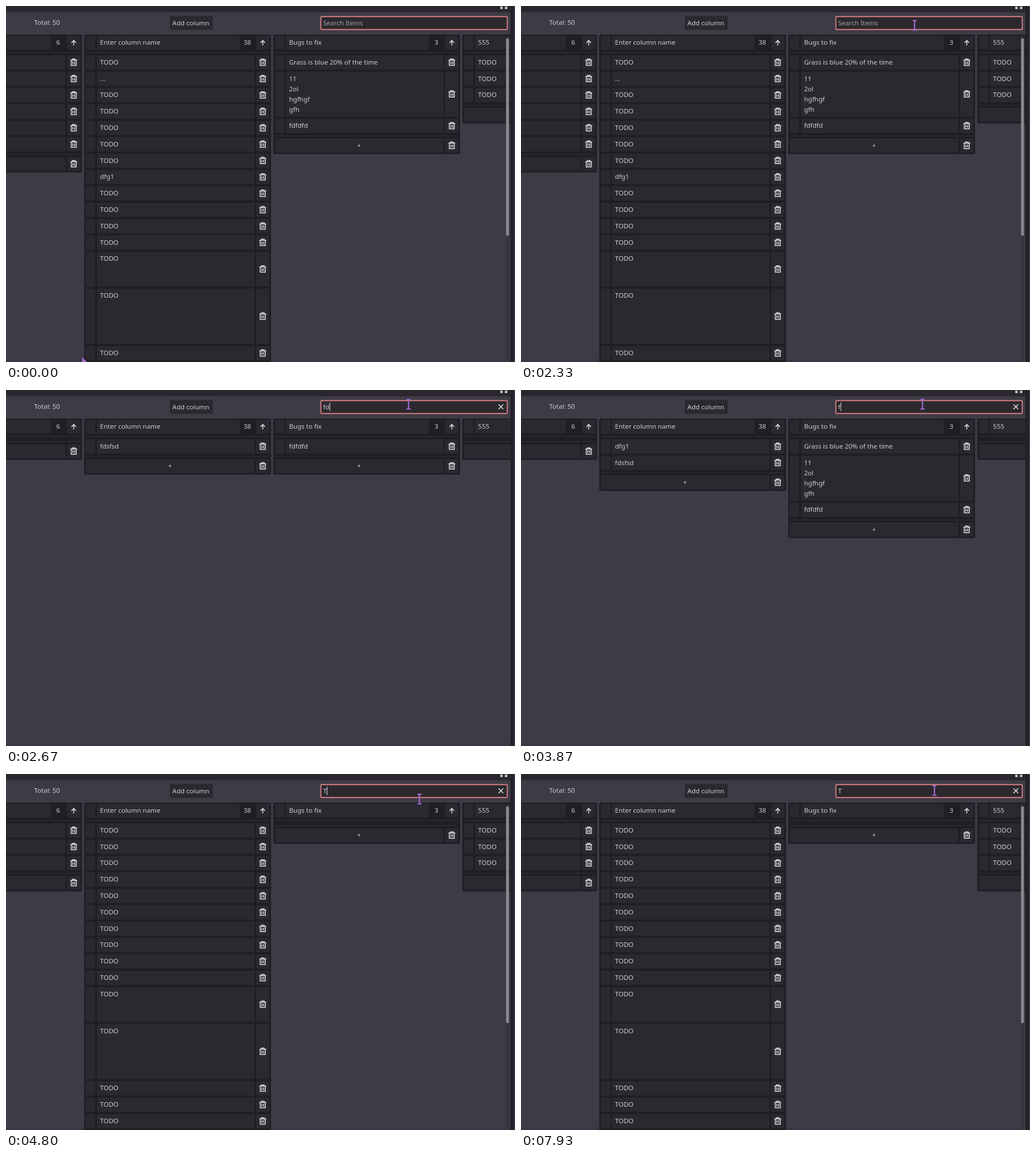
An HTML page for the animation above (8000 ms loop, 895 px wide and 626 px high).

```html
<!DOCTYPE html>
<html lang="en">
<head>
<meta charset="utf-8">
<title>Task board search</title>
<style>
  html, body { margin: 0; width: 100%; height: 100%; overflow: hidden; background: #3e3b46; }
  svg { display: block; width: 895px; height: 626px; }
  text { font: 11.5px "Noto Sans", sans-serif; fill: #cecdd0; white-space: pre; }
  .mid { text-anchor: middle; }
  .col { fill: #201e24; }
  .cell { fill: #2b292f; }
  .line { fill: #35333b; }
  .icon { fill: none; stroke: #e2e1e4; stroke-width: 1.5; }
  #hint { fill: #a3a2a8; }
  #cursor path { display: none; }
  #cursor.beam .beam, #cursor.arrow .arrow { display: inline; }
</style>
</head>
<body>
<svg viewBox="0 0 895 626">
  <defs>
    <g id="trash" class="icon">
      <path d="M-2.5-4.6V-6H2.5V-4.6M-6-4H6M-4.4-4V5.3H4.4V-4M-1.5-1.6V3.2M1.5-1.6V3.2"/>
    </g>
    <path id="up" class="icon" stroke-width="1.8" d="M0 5V-3.4M-4 .6L0-3.6L4 .6"/>
    <clipPath id="frame"><path d="M0 11H887V626H0Z"/></clipPath>
  </defs>
  <rect width="895" height="626" fill="#3e3b46"/>
  <rect y="622.5" width="887" height="3.5" fill="#393641"/>
  <rect width="895" height="11" fill="#2a282e"/>
  <rect x="887" width="6" height="626" fill="#232127"/>
  <rect x="893" width="2" height="626" fill="#393640"/>
  <path class="icon" d="M870 .8V4.4H873.6M870.4 4L873.4 1M880.6 .8V4.4H877M880.2 4L877.2 1"/>

  <text x="49.5" y="33">Total: 50</text>
  <rect class="cell" x="288" y="17.5" width="75.5" height="24.5" rx="2"/>
  <text class="mid" x="325" y="33.6">Add column</text>

  <g id="board" clip-path="url(#frame)"></g>

  <rect x="553.6" y="18.6" width="327.8" height="22.8" rx="1.5" fill="#2b292f" stroke="#e5878b" stroke-width="1.7"/>
  <text id="hint" x="557.5" y="33.6">Search Items</text>
  <text id="query" x="557.5" y="33.6"></text>
  <rect id="caret" y="22" width="1" height="15" fill="#dddce0"/>
  <path id="clear" class="icon" d="M866 25.3L874.4 33.7M874.4 25.3L866 33.7"/>

  <g id="cursor">
    <path class="beam" d="M-3.6-8.3H-1.6Q0-8.3 0-7Q0-8.3 1.6-8.3H3.6M0-7V7M-3.6 8.3H-1.6Q0 8.3 0 7Q0 8.3 1.6 8.3H3.6"
      fill="none" stroke="#a467cf" stroke-width="2.2"/>
    <path class="arrow" d="M0 0V17L4.2 13L7 19L9.6 18L7 12H12Z" fill="#b06fd8" stroke="#8a4fb5" stroke-width=".7"/>
  </g>
</svg>
<script>
const $ = id => document.getElementById(id);
const LOOP = 8000, STEP = 1000 / 15;
const PITCH = 332.4, LEFT = 137.5, GAP = 3.8;

const rect = (cls, x, y, w, h, r = 1.5) =>
  `<rect class="${cls}" x="${x}" y="${y}" width="${w}" height="${h}" rx="${r}"/>`;
const label = (x, y, s, cls = '') => `<text class="${cls}" x="${x}" y="${y}">${s}</text>`;
const icon = (id, x, y) => `<use href="#${id}" x="${x}" y="${y}"/>`;
const button = (id, y, h) => rect('cell', 302.5, y, 23, h) + icon(id, 314, y + h / 2);

function row(s, y) {
  const lines = s.split('\n'), h = 7 + 18 * lines.length;
  const svg = rect('cell', 3, y, 16.5, h) + rect('cell', 22.5, y, 277, h) + button('trash', y, h) +
    lines.map((l, i) => label(27.8, y + 16 + 18 * i, l)).join('');
  return { svg, h };
}

function column(index, name, count, items) {
  let y = 86.7, svg = '';
  for (const s of items) {
    const r = row(s, y);
    svg += r.svg;
    y += r.h + GAP;
  }
  const end = items.length ? y - GAP : 85.6, foot = end + 9.8;
  return `<g transform="translate(${LEFT + index * PITCH})">` +
    rect('col', 0, 50, 328.5, foot + 27.3 - 50, 3) +
    rect('cell', 3, 52, 16.5, 24.5) + rect('cell', 22.5, 52, 251, 24.5) + button('up', 52, 24.5) +
    label(27.8, 68.2, name) + label(286.8, 67.8, count, 'mid') +
    rect('line', 3, 81.3, 322.5, 1, 0) + svg + rect('line', 3, end + 4.7, 322.5, 1, 0) +
    rect('cell', 3, foot, 296.5, 24.5) + label(151, foot + 15.8, '+', 'mid') +
    button('trash', foot, 24.5) + '</g>';
}

const todo = n => Array(n).fill('TODO');
const tall = ['TODO\n\n', 'TODO\n\n\n\n'];
const bugs = ['Grass is blue 20% of the time', '11\n2ol\nhgfhgf\ngfh', 'fdfdfd'];
const views = {
  '': [todo(6), ['TODO', '...', ...todo(5), 'dfg1', ...todo(4), ...tall, ...todo(3)], bugs, todo(3), 404],
  f: [[], ['dfg1', 'fdsfsd'], bugs, []],
  fd: [[], ['fdsfsd'], ['fdfdfd'], []],
  T: [todo(3), [...todo(10), ...tall, ...todo(5)], [], todo(3), 438]
};
const heads = [['', 6], ['Enter column name', 38], ['Bugs to fix', 3], ['555', 3]];

function boardView(key) {
  const v = views[key], thumb = v[4];
  const bar = thumb ? '<rect x="879.5" y="55" width="5" height="571" fill="#37343e"/>' +
    `<rect x="879.3" y="57" width="5" height="${thumb - 57}" rx="2" fill="#8b8990"/>` : '';
  return `<g data-key="${key}">` + heads.map((h, i) => column(i - 1, ...h, v[i])).join('') + bar + '</g>';
}
$('board').innerHTML = Object.keys(views).map(boardView).join('');

const edits = [[0, ''], [2470, 'f'], [2600, 'fd'], [3870, 'f'], [4070, ''], [4800, 'T'], [4930, 'TO'],
  [5130, 'TOD'], [5200, 'TODO'], [6470, 'TOD'], [6670, 'TO'], [7930, 'T']];
const caretOn = [[1730, 2270], [2470, 3200], [3730, 4670], [4800, 5670], [6200, 7200], [7670, 7930]];
// time, x, y of the pointer
const path = [[0, 134, 618], [130, 94, 570], [330, 215, 350], [530, 510, 190], [670, 738, 126],
  [800, 702, 110], [930, 674, 141], [1070, 675, 149], [1400, 680, 104], [1730, 680, 59],
  [2000, 690, 26], [2200, 692, 34], [2400, 692, 34], [2670, 708, 25], [2900, 708, 24],
  [3270, 705, 23], [3400, 705, 23], [3670, 706, 23], [3730, 706, 25], [4200, 706, 25],
  [4470, 727, 44], [7600, 727, 44], [7930, 727, 29], [LOOP, 727, 29]];

function pointer(t) {
  const i = Math.max(1, path.findIndex(p => p[0] >= t));
  const [t0, x0, y0] = path[i - 1], [t1, x1, y1] = path[i], k = (t - t0) / (t1 - t0);
  return [x0 + (x1 - x0) * k, y0 + (y1 - y0) * k];
}

const show = (el, on) => { el.style.display = on ? '' : 'none'; };

function draw(now) {
  const t = now % LOOP;
  const text = edits.filter(e => e[0] <= t + 3).pop()[1];
  const key = text[0] === 'T' ? 'T' : text;
  for (const g of $('board').children) show(g, g.dataset.key === key);

  const query = $('query');
  if (query.textContent !== text) query.textContent = text;
  show($('hint'), !text);
  show($('clear'), text);
  show($('caret'), caretOn.some(([a, b]) => t + 3 >= a && t + 3 < b));
  $('caret').setAttribute('x', Math.round(557.6 + (text ? query.getComputedTextLength() : 0)));

  const [x, y] = pointer(Math.floor((t + 4) / STEP) * STEP);
  $('cursor').setAttribute('transform', `translate(${x.toFixed(1)} ${y.toFixed(1)})`);
  $('cursor').setAttribute('class', x < 160 || (x > 437 && x < 492) ? 'arrow' : 'beam');
}

const start = performance.now();
function tick() {
  draw(performance.now() - start);
  requestAnimationFrame(tick);
}
tick();
</script>
</body>
</html>
```
